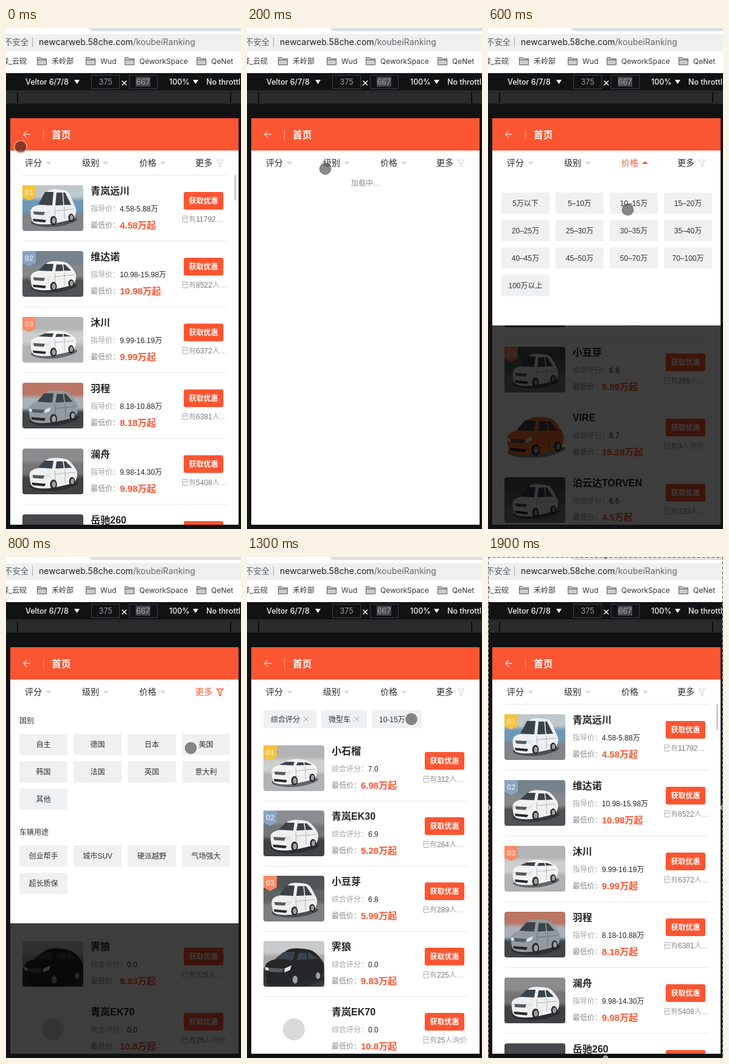
An HTML page with a canvas that plays this animation: 386x822 px, repeating every 2000 ms.

```html
<!DOCTYPE html>
<html lang="zh">
<head>
<meta charset="utf-8">
<style>
html, body { margin: 0; width: 100%; height: 100%; overflow: hidden; background: #111214; }
canvas { display: block; width: 386px; height: 822px; }
</style>
</head>
<body>
<canvas id="stage"></canvas>
<script>
const W = 386, H = 822, STEP = 100, STEPS = 20;
const ORANGE = '#fc5531';
const SANS = '"Liberation Sans", "Noto Sans CJK SC", "Noto Sans CJK", sans-serif';
const UI = 'Inter, "Noto Sans CJK SC", "Noto Sans CJK", sans-serif';
const canvas = document.getElementById('stage');
const g = canvas.getContext('2d');
const dpr = window.devicePixelRatio || 1;
canvas.width = W * dpr;
canvas.height = H * dpr;

// Car pictures: upper band, wall, floor, body, height of the roof, scale
const pics = {
  van:    ['#bfc7ca', '#6d98b8', '#828588', '#eceff1', 8, 1],
  sedan:  ['#76828d', '#85888b', '#4f5255', '#f1f1ef', 18, 1],
  pale:   ['#b2b4b5', '#cdcece', '#b0b2b3', '#f2f3f3', 24, 1],
  hatch:  ['#bb7565', '#a9b0b6', '#414548', '#929a9f', 16, 1.08],
  grey:   ['#8a8c8e', '#737577', '#3f4143', '#eeefef', 18, 1.05],
  dark:   ['#45494c', '#53575a', '#74787a', '#cfd1d2', 20, 1],
  mini:   ['#515456', '#606365', '#7d7f81', '#eeeeee', 13, 1],
  orange: ['#ffffff', '#ffffff', '#ffffff', '#f9702b', 16, 1.25],
  shade:  ['#c9cacb', '#a5a6a7', '#3a3b3c', '#242628', 20, 1.3]
};

// name, figure, lowest price, people, picture
const byHeat = [
  ['青岚远川', '4.58-5.88万', '4.58', '11792…', 'van'],
  ['维达诺', '10.98-15.98万', '10.98', '8522人…', 'sedan'],
  ['沐川', '9.99-16.19万', '9.99', '6372人…', 'pale'],
  ['羽程', '8.18-10.88万', '8.18', '6381人…', 'hatch'],
  ['澜舟', '9.98-14.30万', '9.98', '5408人…', 'grey'],
  ['岳驰260', '5.08-6.98万', '5.08', '4310人…', 'dark']
];
const byScore = [
  ['小石榴', '7.0', '6.98', '312人…', 'pale'],
  ['青岚EK30', '6.9', '5.28', '264人…', 'grey'],
  ['小豆芽', '6.8', '5.99', '289人…', 'mini'],
  ['VIRE', '6.7', '15.28', '3人询价', 'orange'],
  ['泊云达TORVEN', '6.6', '4.5', '220人…', 'mini']
];
const byPrice = [
  ...byScore.slice(0, 3),
  ['霁狼', '0.0', '9.83', '225人…', 'shade'],
  ['青岚EK70', '0.0', '10.8', '25人询价', null]
];

const tags = ['综合评分', '微型车', '10-15万', '美国'];
const filters = [['评分', 31], ['级别', 125], ['价格', 219], ['更多', 311]];
const panels = [
  { end: 398, groups: [[270, ['综合评分', '外观', '内饰', '空间', '动力', '操控', '油耗', '舒适性']]] },
  { end: 398, groups: [[270, ['微型车', '小型车', '紧凑型车', '中型车', '中大型车', '豪华车', 'SUV', 'MPV']]] },
  { end: 488, groups: [[270, ['5万以下', '5–10万', '10–15万', '15–20万', '20–25万', '25–30万', '30–35万',
    '35–40万', '40–45万', '45–50万', '50–70万', '70–100万', '100万以上']]] },
  { end: 601, groups: [
    [290, ['自主', '德国', '日本', '美国', '韩国', '法国', '英国', '意大利', '其他'], '国别'],
    [473, ['创业帮手', '城市SUV', '硬派越野', '气场强大', '超长质保'], '车辆用途']] }
];

// One entry per step: list (none means loading), tag count, open panel, touch point
const scenes = [
  { list: byHeat, at: [24, 195], press: true },
  { list: byHeat, panel: 0, at: [60, 287] },
  { at: [128.5, 231] },
  { list: byScore, tags: 1, panel: 1, at: [62, 288] },
  { tags: 2, at: [120, 262] },
  { list: byScore, tags: 2, at: [232, 226] },
  { list: byScore, tags: 2, panel: 2, at: [229.5, 298] },
  { tags: 3, at: [310, 230] },
  { list: byPrice, tags: 3, panel: 3, at: [303.5, 313.5] },
  { tags: 4, at: [316, 306] },
  { tags: 4, bar: true, at: [332, 284] },
  { tags: 4, bar: true, status: true, at: [339.5, 271] },
  { tags: 3, status: true, at: [305, 268] },
  { list: byPrice, tags: 3, at: [270, 266] },
  { list: byScore, tags: 2, at: [180, 266] },
  { tags: 1, at: [144.5, 238] },
  { list: byScore, tags: 1, at: [98, 266] },
  { at: [98, 266] },
  { list: byHeat, marked: true, at: [110, 262] },
  { list: byHeat, marked: true }
];

function box(x, y, w, h, fill, r = 0) {
  g.fillStyle = fill;
  g.beginPath();
  g.roundRect(x, y, w, h, r);
  g.fill();
}

function poly(fill, ...p) {
  g.fillStyle = fill;
  g.beginPath();
  for (let i = 0; i < p.length; i += 2) g.lineTo(p[i], p[i + 1]);
  g.closePath();
  g.fill();
}

// Closed shape with rounded corners, through the middles of its sides
function soft(fill, ...p) {
  const n = p.length / 2;
  const mid = i => [0, 1].map(k => (p[2 * (i % n) + k] + p[2 * ((i + 1) % n) + k]) / 2);
  g.fillStyle = fill;
  g.beginPath();
  g.moveTo(...mid(0));
  for (let i = 1; i <= n; i++) g.quadraticCurveTo(p[2 * (i % n)], p[2 * (i % n) + 1], ...mid(i));
  g.fill();
}

function line(color, width, ...p) {
  g.strokeStyle = color;
  g.lineWidth = width;
  g.beginPath();
  for (let i = 0; i < p.length; i += 4) {
    g.moveTo(p[i], p[i + 1]);
    g.lineTo(p[i + 2], p[i + 3]);
  }
  g.stroke();
}

function oval(x, y, rx, ry, fill) {
  g.fillStyle = fill;
  g.beginPath();
  g.ellipse(x, y, rx, ry, 0, 0, Math.PI * 2);
  g.fill();
}

function disc(x, y, r, fill) {
  oval(x, y, r, r, fill);
}

// y is the middle of the glyphs; returns the x where the text ends
function text(s, x, y, size, color, { weight = 400, align = 'left', font = SANS } = {}) {
  g.font = `${weight} ${size}px ${font}`;
  g.textAlign = align;
  g.fillStyle = color;
  g.fillText(s, x, y + size * 0.36);
  return x + g.measureText(s).width;
}

function folder(x) {
  g.fillStyle = '#c9cbcd';
  g.strokeStyle = '#5b5e61';
  g.lineWidth = 1;
  g.beginPath();
  g.moveTo(x + 0.5, 60.5);
  for (const [dx, y] of [[0.5, 48.5], [6, 48.5], [7.5, 50.5], [15.5, 50.5], [15.5, 60.5]]) g.lineTo(x + dx, y);
  g.closePath();
  g.fill();
  g.stroke();
  line('#5b5e61', 1, x + 1, 52.5, x + 15, 52.5);
}

function browser() {
  box(0, 0, W, 74, '#fff');
  box(137, -6, 260, 11, '#dcdfe2', 5);
  box(-20, 10, 430, 28, '#eeefef');
  text('不安全', 37, 23, 13.3, '#5f6368', { align: 'right', font: UI });
  line('#a4a7aa', 1, 43.5, 15, 43.5, 31);
  const end = text('newcarweb.58che.com', 54, 23, 14, '#202124', { font: UI });
  text('/koubeiRanking', end, 23, 14, '#65696d', { font: UI });
  text('译_云砚', 34, 55, 12, '#303336', { align: 'right', font: UI });
  for (const [x, s] of [[51, '禾岭部'], [131, 'Wud'], [195, 'QeworkSpace'], [313, 'QeNet']]) {
    folder(x);
    text(s, x + 24, 55, 12, '#303336', { font: UI });
  }
}

function devtools() {
  box(0, 74, W, H - 74, '#111214');
  const white = '#f4f5f5', label = { font: UI, weight: 500 };
  text('Veltor 6/7/8', 32, 88.5, 12.5, white, label);
  poly(white, 112, 85, 121, 85, 116.5, 92);
  g.strokeStyle = '#3d3f41';
  g.lineWidth = 1;
  g.strokeRect(140.5, 77.5, 46, 22);
  g.strokeRect(202.5, 77.5, 46, 22);
  box(213, 80, 24, 16, '#47494c');
  text('375', 163.5, 88.5, 12.5, '#9b9ea1', { font: UI, align: 'center' });
  text('667', 225, 88.5, 12.5, '#a3a6a9', { font: UI, align: 'center' });
  line(white, 1.6, 190.5, 86.5, 198, 94, 198, 86.5, 190.5, 94);
  text('100%', 268, 88.5, 12.5, white, label);
  poly(white, 307, 85, 316, 85, 311.5, 92);
  text('No throttling', 329, 88.5, 12.5, white, label);
  line('#46484a', 1, 0, 103.5, W, 103.5);
  box(0, 105, W, 19, '#2a2b2d');
  line('#0b0c0d', 2, 19, 106, 19, 123, 369, 106, 369, 123);
}

function header() {
  box(7, 148, 375, 53, ORANGE);
  line('#ffd3c6', 1.3, 28.5, 174.5, 40, 174.5, 28.5, 174.5, 34, 169, 28.5, 174.5, 34, 180);
  line('#ffa890', 1.3, 61.5, 167, 61.5, 183);
  text('首页', 75, 175, 15.7, '#fff', { weight: 700 });
}

function filterRow(active) {
  filters.forEach(([name, x], i) => {
    const on = i === active, color = on ? ORANGE : '#d3d5d7';
    text(name, x, 221, 14, on ? ORANGE : '#27292b');
    if (i < 3) {
      const base = on ? 223 : 219.5, tip = on ? 218.5 : 224;
      poly(color, x + 34, base, x + 44, base, x + 39, tip);
    } else {
      g.strokeStyle = color;
      g.lineWidth = on ? 1.5 : 1.2;
      g.beginPath();
      for (const [px, py] of [[346.5, 216.5], [356.5, 216.5], [353, 221], [353, 227.5], [350, 226], [350, 221]]) g.lineTo(px, py);
      g.closePath();
      g.stroke();
    }
  });
}

function car(body, top) {
  const glass = '#3b434a', ink = '#26292c';
  soft('rgba(25,28,30,.5)', 16, 56, 60, 60, 94, 52, 92, 60, 56, 70, 18, 66);
  oval(83, 53, 5, 7, ink);
  soft(body, 17, 52, 16, 40, 22, 34, 36, 31, 43, top, 56, top - 2, 74, top, 80, top + 4, 88, 32, 92, 40, 89, 55,
    64, 61, 44, 65, 20, 63);
  poly(glass, 29, 32, 40, top + 3, 54, top + 3, 52, 33);
  poly(glass, 57, 33, 59, top + 4, 73, top + 4, 83, 32);
  line(body, 1.5, 69, top + 3, 71, 34);
  line('rgba(40,44,48,.3)', 1, 56, 36, 57, 58, 72, 35, 72, 56, 56, 42, 88, 39);
  poly('#555b60', 21, 43, 40, 44, 38, 49, 22, 48);
  poly(ink, 20, 55, 42, 57, 40, 61, 21, 59);
  poly('#dfe6ea', 17, 42, 21, 43, 21, 47, 17, 46);
  poly('#dfe6ea', 41, 44, 50, 40, 48, 46, 41, 49);
  for (const [x, y, r] of [[54, 58, 7.5], [83, 53, 6.5]]) {
    oval(x, y, r * 0.72, r, ink);
    oval(x + 0.5, y, r * 0.42, r * 0.65, '#9da1a4');
  }
}

function picture(kind, y) {
  g.save();
  g.translate(27, y);
  g.beginPath();
  g.roundRect(0, 0, 100, 75, 4);
  g.clip();
  if (!kind) {
    box(0, 0, 100, 75, '#fff');
    disc(50, 38, 18, '#d9dadb');
  } else {
    const [band, wall, floor, body, top, scale] = pics[kind];
    const back = g.createLinearGradient(0, 0, 0, 75);
    [[0, band], [0.25, band], [0.35, wall], [0.55, wall], [0.65, floor], [1, floor]].forEach(s => back.addColorStop(...s));
    box(0, 0, 100, 75, back);
    g.translate(50, 40);
    g.scale(scale, scale);
    g.translate(-53, -40);
    car(body, top);
  }
  g.restore();
}

function badge(i, y) {
  const color = ['#f8c23a', '#8ba3c4', '#f98b68'][i];
  poly(color, 27, y, 49, y, 49, y + 19, 38, y + 25, 27, y + 19);
  text('0' + (i + 1), 38, y + 11, 13, 'rgba(255,255,255,.6)', { align: 'center', weight: 700 });
}

function carRow([name, figure, low, people, kind], i, y, label) {
  picture(kind, y);
  if (i < 3) badge(i, y);
  text(name, 139, y + 9.5, 16, '#222426', { weight: 700 });
  const end = text(label, 139, y + 38.5, 12, '#a0a2a4');
  text(figure, end, y + 38.5, 12, '#222426');
  text('最低价：', 139, y + 66, 12, '#85878a');
  text(low + '万起', 187, y + 65.5, 15, ORANGE, { weight: 700 });
  box(292, y + 11, 65, 29, ORANGE, 3);
  text('获取优惠', 324.5, y + 26, 12, '#fff', { weight: 700, align: 'center' });
  const [, count, rest] = people.match(/^(\d+)(.*)$/);
  let x = text('已有', 288, y + 55.5, 12, '#a0a2a4');
  x = text(count, x, y + 55.5, 12, '#77797c');
  text(rest, x, y + 55.5, 12, '#a0a2a4');
  line('#e5e6e7', 1, 27, y + 91.5, 362, y + 91.5);
}

function carList(rows, tagged) {
  const plain = rows === byHeat;
  const top = tagged ? 309 : 258, pitch = tagged ? 107 : 108;
  if (plain) line('#e5e6e7', 1, 27, 241.5, 362, 241.5);
  rows.forEach((r, i) => carRow(r, i, top + pitch * i, plain ? '指导价：' : '综合评分：'));
  if (plain) box(375, 241, 3, 42, '#cbcccd', 1.5);
}

function tagRow(n) {
  let x = 27;
  for (const name of tags.slice(0, n)) {
    g.font = `12px ${SANS}`;
    const w = g.measureText(name).width + 39;
    box(x, 251, w, 30, '#eff0f2', 2);
    text(name, x + 12, 266.5, 12, '#303234');
    const c = x + w - 17;
    line('#a3a5a8', 1, c - 4, 262, c + 4, 270, c + 4, 262, c - 4, 270);
    x += w + 8;
  }
}

function dropdown(i) {
  const { end, groups } = panels[i];
  box(7, 201, 375, 614, 'rgba(0,0,0,.76)');
  box(7, 201, 375, end - 201, '#fff');
  for (const [top, names, title] of groups) {
    if (title) text(title, 22, top - 21.5, 12, '#303234');
    names.forEach((name, k) => {
      const x = 22 + 89 * (k % 4), y = top + 45 * Math.floor(k / 4);
      box(x, y, 79, 35, '#eff0f1');
      text(name, x + 39.5, y + 18, 12, '#303234', { align: 'center' });
    });
  }
}

function statusBubble() {
  g.save();
  g.shadowColor = 'rgba(0,0,0,.2)';
  g.shadowBlur = 8 * dpr;
  box(7, 794, 124, 24, '#b9bcbf', [0, 4, 0, 0]);
  g.restore();
  box(7, 795, 123, 23, '#dcdee1', [0, 3, 0, 0]);
  text('正在等待 10.167.1...', 12, 805, 12, '#3e4144');
}

function touch([x, y], press) {
  disc(x, y, 9.5, press ? 'rgba(80,40,32,.66)' : 'rgba(75,75,75,.65)');
  g.strokeStyle = press ? 'rgba(255,190,170,.75)' : 'rgba(90,90,90,.45)';
  g.lineWidth = 1.2;
  g.beginPath();
  g.arc(x, y, press ? 10.3 : 9.3, 0, Math.PI * 2);
  g.stroke();
}

function selection() {
  const edges = [0, 0.5, W, 0.5, 0.5, 0, 0.5, H, W - 0.5, 0, W - 0.5, H];
  line('#d0d0d0', 1, ...edges);
  g.setLineDash([4, 4]);
  line('#55585a', 1, ...edges);
  g.setLineDash([]);
  for (const [x, y] of [[0, 411], [W, 411], [193, 0], [193, H]]) {
    disc(x, y, 4, '#e4e4e4');
    disc(x, y, 3, '#77797b');
  }
}

function draw(s) {
  g.setTransform(dpr, 0, 0, dpr, 0, 0);
  browser();
  devtools();
  g.save();
  g.beginPath();
  g.rect(7, 148, 375, 667);
  g.clip();
  box(7, 148, 375, 667, '#fff');
  if (s.tags) tagRow(s.tags);
  if (s.bar) box(31, 284, 323, 3, '#d6d9dc', 1.5);
  if (s.list) carList(s.list, s.tags);
  else text('加载中...', 194, s.tags ? 305 : 255, 12, '#898b8d', { align: 'center' });
  if (s.panel !== undefined) dropdown(s.panel);
  header();
  filterRow(s.panel);
  if (s.status) statusBubble();
  g.restore();
  if (s.at) touch(s.at, s.press);
  if (s.marked) selection();
}

const start = performance.now();
function tick() {
  const t = performance.now() - start;
  draw(scenes[Math.floor(t / STEP) % STEPS]);
  requestAnimationFrame(tick);
}
tick();
</script>
</body>
</html>
```
